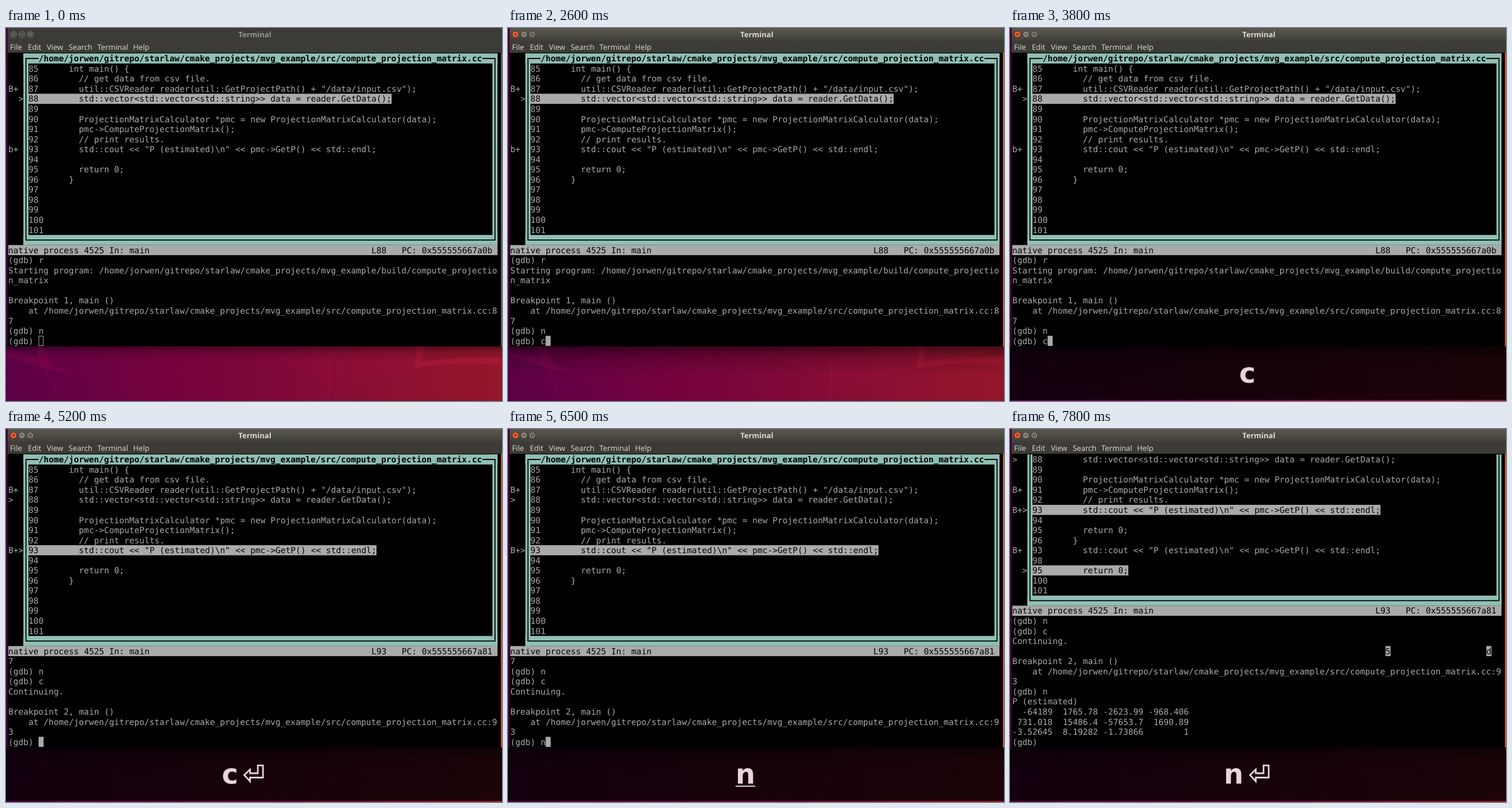
An HTML page for the animation above (8000 ms loop, 863 by 649 pixels).

```html
<!DOCTYPE html>
<html lang="en">
<head>
<meta charset="utf-8">
<title>Terminal</title>
<style>
html, body { margin: 0; width: 100%; height: 100%; overflow: hidden; background: #000; }
svg { display: block; width: 863px; height: 649px; }
text { white-space: pre; text-rendering: geometricPrecision; }
.mono { font: 14.576px "DejaVu Sans Mono", monospace; fill: #aaa; }
.mono.dark { fill: #000; }
.mono.bold { font-weight: bold; fill: #000; }
.menu { font: 13.2px "Open Sans", "Noto Sans", sans-serif; fill: #dfdbd2; }
.title { font: bold 13px "Open Sans", "Noto Sans", sans-serif; text-anchor: middle; }
.key { font: bold 48px "DejaVu Sans", sans-serif; fill: #e6d5da; }
.enter { fill: none; stroke: #e6d5da; stroke-width: 2.8; }
</style>
</head>
<body>
<svg id="stage" viewBox="0 0 863 649">
  <defs>
    <linearGradient id="wall" gradientUnits="userSpaceOnUse" x1="0" y1="649" x2="863" y2="520">
      <stop offset="0" stop-color="#5c0047"/>
      <stop offset=".3" stop-color="#74023f"/>
      <stop offset=".6" stop-color="#820a36"/>
      <stop offset="1" stop-color="#96172a"/>
    </linearGradient>
    <linearGradient id="shade" x1="0" y1="0" x2="0" y2="1">
      <stop offset="0" stop-color="#000" stop-opacity=".5"/>
      <stop offset=".4" stop-color="#000" stop-opacity=".17"/>
      <stop offset="1" stop-color="#000" stop-opacity="0"/>
    </linearGradient>
    <linearGradient id="bar" x1="0" y1="0" x2="0" y2="1">
      <stop offset="0" stop-color="#5a584e"/>
      <stop offset="1" stop-color="#3e3d38"/>
    </linearGradient>
  </defs>

  <rect width="863" height="649" fill="url(#wall)"/>
  <g fill="#c01850" fill-opacity=".16">
    <path d="M0 560L58 574L50 554H66L80 586L120 600L78 594L0 572Z"/>
    <path d="M66 580L98 649H92L58 580Z" fill-opacity=".07"/>
    <path d="M563 554H566L562 649H559Z"/>
    <path d="M520 649Q610 606 712 589V592Q615 610 530 649Z" fill-opacity=".1"/>
    <path d="M470 574L712 554V590L560 620Z" fill-opacity=".06"/>
  </g>
  <path d="M714 554H727L723 580Q800 570 863 575V587Q790 578 711 592Z" fill="#c01c40" fill-opacity=".38"/>
  <rect width="3" height="554" fill="#000" fill-opacity=".3"/>

  <g data-on="0-1500">
    <rect y="554" width="863" height="26" fill="url(#shade)" opacity=".8"/>
    <rect x="3" width="860" height="24" fill="#3c3b37"/>
    <text class="title" x="433" y="16" fill="#99968f">Terminal</text>
    <g fill="#4b4a45" stroke="#76746c">
      <circle cx="13" cy="11" r="5.3"/><circle cx="27.7" cy="11" r="5.3"/><circle cx="42.3" cy="11" r="5.3"/>
    </g>
    <path d="M11 9l4 4m0-4l-4 4M25.2 11h5M40.3 9h4v4h-4z" fill="none" stroke="#85827a"/>
  </g>
  <g data-on="1500-8000">
    <rect y="554" width="863" height="49" fill="url(#shade)"/>
    <rect x="3" width="860" height="24" fill="url(#bar)"/>
    <text class="title" x="433" y="16" fill="#dfdbd2">Terminal</text>
    <g fill="#85837a" stroke="#33322e">
      <circle cx="13" cy="11" r="5.8" fill="#ed5a32"/><circle cx="27.7" cy="11" r="5.8"/><circle cx="42.3" cy="11" r="5.8"/>
    </g>
    <path d="M11 9l4 4m0-4l-4 4M25.2 11h5M40.3 9h4v4h-4z" fill="none" stroke="#3a2a24"/>
  </g>
  <rect x="3" y="23.5" width="860" height="20" fill="#3c3b37"/>
  <g class="menu">
    <text x="7" y="38">File</text><text x="38" y="38">Edit</text><text x="71" y="38">View</text>
    <text x="109" y="38">Search</text><text x="159" y="38">Terminal</text><text x="221" y="38">Help</text>
  </g>
  <rect x="3" y="43" width="858" height="511" fill="#000"/>
  <rect x="861" y="43" width="2" height="511" fill="#5c5853" data-on="0-1500"/>
  <rect x="861" y="43" width="2" height="511" fill="#c4572f" data-on="1500-8000"/>
</svg>

<script>
const stage = document.getElementById('stage');
const LOOP = 8000, CELL = 8.775, ROW = 17.55, GREY = '#aaa', TEAL = '#8fbfb3';
const colX = c => 4 + c * CELL;
const rowY = r => 44.2 + r * ROW;

function add(parent, tag, attrs, text = '') {
  const el = document.createElementNS('http://www.w3.org/2000/svg', tag);
  for (const name in attrs) el.setAttribute(name, attrs[name]);
  el.textContent = text;
  return parent.appendChild(el);
}
const group = on => add(stage, 'g', { 'data-on': on });
const rect = (g, x, y, width, height, fill) => add(g, 'rect', { x, y, width, height, fill });
const cells = (g, row, from, to, fill, rows = 1) =>
  rect(g, colX(from), rowY(row), (to - from) * CELL, rows * ROW, fill);

// Each word is anchored to its own cell of the character grid.
function write(g, row, col, text, style = '') {
  for (const word of text.matchAll(/\S+/g))
    add(g, 'text', { class: 'mono ' + style, x: colX(col + word.index), y: rowY(row) + 14 }, word[0]);
}
function marked(g, row, col, text) {
  cells(g, row, col, col + text.length, GREY);
  write(g, row, col, text, 'dark');
}

const project = '/home/jorwen/gitrepo/starlaw/cmake_projects/mvg_example';
const file = project + '/src/compute_projection_matrix.cc';
const code = {
  85: 'int main() {',
  86: '  // get data from csv file.',
  87: '  util::CSVReader reader(util::GetProjectPath() + "/data/input.csv");',
  88: '  std::vector<std::vector<std::string>> data = reader.GetData();',
  90: '  ProjectionMatrixCalculator *pmc = new ProjectionMatrixCalculator(data);',
  91: '  pmc->ComputeProjectionMatrix();',
  92: '  // print results.',
  93: '  std::cout << "P (estimated)\\n" << pmc->GetP() << std::endl;',
  95: '  return 0;',
  96: '}'
};

function codeRow(g, row, number, active) {
  const line = code[number] ? String(number).padEnd(8) + code[number] : String(number);
  (active ? marked : write)(g, row, 4, line);
}
function border(g, bottom, titled) {
  const left = colX(3.5), right = colX(96.5), base = rowY(bottom + .5);
  cells(g, 0, 3, 4, TEAL, bottom + 1);
  cells(g, 0, 96, 97, TEAL, bottom + 1);
  cells(g, bottom, 3, 97, TEAL);
  let d = `M${left} ${rowY(0)}V${base}H${right}V${rowY(0)}`;
  if (titled) {
    cells(g, 0, 3, 97, TEAL);
    write(g, 0, 6, file, 'bold');
    const top = rowY(.5);
    d = `M${colX(6)} ${top}H${left}V${base}H${right}V${top}H${colX(94)}`;
  }
  add(g, 'path', { d, fill: 'none', stroke: '#000', 'stroke-width': 1.8 });
}
function status(g, row, line, pc) {
  cells(g, row, 0, 97, GREY);
  write(g, row, 0, 'native process 4525 In: main', 'dark');
  write(g, row, 72, `L${line}   PC: 0x555555667a${pc}`, 'dark');
}
const output = (g, row, lines) => lines.forEach((line, i) => write(g, row + i, 0, line));

function sourceView(g, active) {
  border(g, 18, true);
  for (let n = 85; n <= 101; n++) codeRow(g, n - 84, n, n === active);
  write(g, 3, 0, 'B+');
}

const stopped = group('0-4200');
sourceView(stopped, 88);
write(stopped, 4, 2, '>');
write(stopped, 9, 0, 'b+');
status(stopped, 19, 88, '0b');
output(stopped, 20, [
  '(gdb) r', `Starting program: ${project}/build/compute_projectio`, 'n_matrix', '',
  'Breakpoint 1, main ()', `    at ${file}:8`, '7', '(gdb) n', '(gdb)'
]);

const hit = ['Breakpoint 2, main ()', `    at ${file}:9`, '3'];
const continued = group('4200-7400');
sourceView(continued, 93);
write(continued, 4, 0, '>');
write(continued, 9, 0, 'B+>');
status(continued, 19, 93, '81');
output(continued, 20, ['7', '(gdb) n', '(gdb) c', 'Continuing.', '', ...hit, '(gdb)']);

const printed = group('7400-8000');
border(printed, 14, false);
[88, 89, 90, 91, 92, 93, 94, 95, 96, 93, 98, 95, 100, 101]
  .forEach((n, row) => codeRow(printed, row, n, row === 5 || row === 11));
write(printed, 0, 0, '>');
write(printed, 3, 0, 'B+');
write(printed, 5, 0, 'B+>');
write(printed, 9, 0, 'B+');
write(printed, 11, 2, '>');
status(printed, 15, 93, '81');
marked(printed, 19, 74, '5');
marked(printed, 19, 94, 'd');
output(printed, 16, [
  '(gdb) n', '(gdb) c', 'Continuing.', '', ...hit, '(gdb) n', 'P (estimated)',
  '  -64189  1765.78 -2623.99 -968.406',
  ' 731.018  15486.4 -57653.7  1690.89',
  '-3.52645  8.19282 -1.73866        1', '(gdb)'
]);

write(group('2600-4200'), 28, 6, 'c');
write(group('6500-7400'), 28, 6, 'n');

add(group('0-1500'), 'rect', {
  x: colX(6) + .5, y: rowY(28) + .5, width: CELL - 1, height: ROW - 1, fill: 'none', stroke: GREY
});
cells(group('1500-2400 4200-4600 5200-5800 7400-7800'), 28, 6, 7, GREY);
cells(group('2600-3200 3800-4200 6500-7000 7200-7400'), 28, 7, 8, GREY);

// Key display under the window
add(group('2700-5800 6500-8000'), 'rect', { y: 554, width: 863, height: 93, 'fill-opacity': .81 });

const underline = (on, x, width) => rect(group(on), x, 620.5, width, 2, '#e6d5da');
const key = (on, x, letter) => add(group(on), 'text', { class: 'key', x, y: 617 }, letter);
const enter = (on, x) => add(group(on), 'path', {
  class: 'enter', transform: `translate(${x} 584)`,
  d: 'M2 18L12 8.5V15H25.5V1.4H34.5V22.5H12V29Z'
});
key('2700-4200', 398.8, 'c');
underline('2700-2800', 399, 28);
key('4200-5800', 375.4, 'c');
enter('4200-5800', 412.6);
key('6500-7200', 395.9, 'n');
underline('6500-6600', 396, 34);
key('7200-8000', 372, 'n');
enter('7200-8000', 415.6);
underline('7200-7400', 415, 38);

const timed = [...document.querySelectorAll('[data-on]')].map(el => ({
  el, spans: el.dataset.on.split(' ').map(span => span.split('-').map(Number))
}));
function draw() {
  const t = performance.now() % LOOP;
  for (const { el, spans } of timed)
    el.style.display = spans.some(([from, to]) => t >= from && t < to) ? '' : 'none';
  requestAnimationFrame(draw);
}
draw();
</script>
</body>
</html>
```
